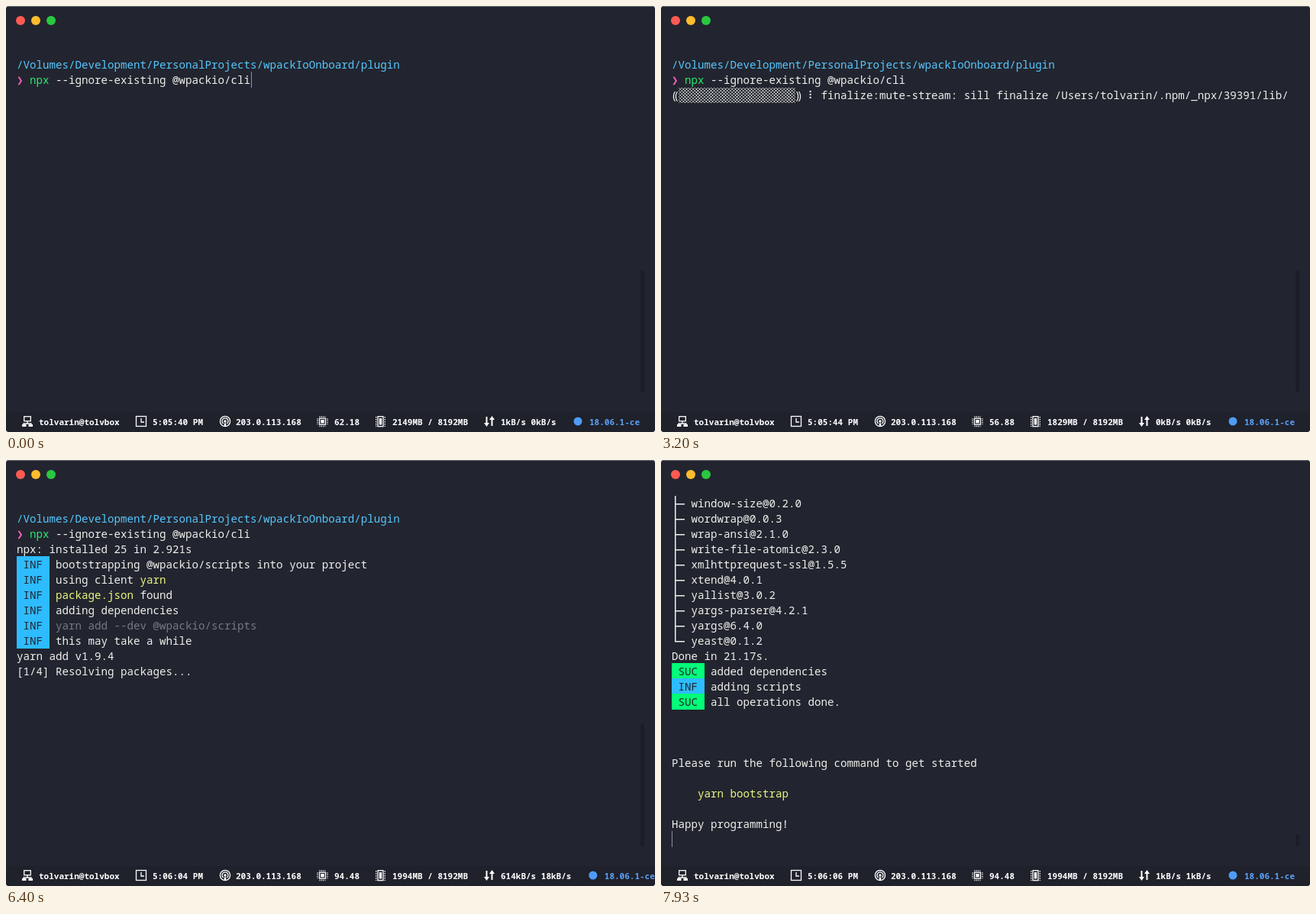
An HTML page that plays this animation: 850 px wide and 558 px high, repeating every 8000 ms.

```html
<!DOCTYPE html>
<html lang="en">
<head>
<meta charset="utf-8">
<title>Terminal</title>
<style>
html, body { margin: 0; width: 100%; height: 100%; overflow: hidden; background: #fff; }
#win { position: absolute; left: 0; top: 0; width: 850px; height: 558px; overflow: hidden;
  border-radius: 4px; background: #22252f; }
#edge { position: absolute; left: 0; top: 0; width: 100%; height: 1px; background: #6d6f76; }
.light { position: absolute; top: 13px; width: 12px; height: 12px; border-radius: 50%; }
#term { position: absolute; left: 14px; top: 47px; color: #eff0eb;
  font: 300 14.18px/20px "Noto Sans Mono", "DejaVu Sans Mono", monospace; font-variant-ligatures: none; }
.row { height: 20px; white-space: pre; }
.row i { display: inline-block; width: 1ch; height: 20px; font-style: normal; vertical-align: top; }
.path { color: #57c7ff; }
.pink { color: #ff5fc4; }
.green { color: #2fe871; }
.yellow { color: #eaf67f; }
.dim { color: #777981; }
.tag { display: inline-block; height: 20px; margin-top: -1px; padding-top: 1px; line-height: 20px;
  vertical-align: top; color: #22252f; font-weight: 400; }
.INF { background: #2dbcff; }
.SUC { background: #00ff78; }
.row .paren { letter-spacing: -5.6px; text-indent: -1px; }
.row .fill { background: radial-gradient(circle, #eff0eb 0.7px, transparent 1.1px) 0 0 / 4.25px 4px,
  radial-gradient(circle, #eff0eb 0.7px, transparent 1.1px) 2.12px 2px / 4.25px 4px; }
.row .twig { --h: 20px; width: 2ch;
  background: linear-gradient(#eff0eb, #eff0eb) 4px 0 / 1.5px var(--h) no-repeat,
  linear-gradient(#eff0eb, #eff0eb) 4px 9.5px / 14px 1.5px no-repeat; }
.row .last { --h: 11px; }
#cursor { position: absolute; width: 1px; height: 21px; background: #8e9095; }
#thumb { position: absolute; left: 831px; width: 5px; bottom: 52px; border-radius: 2px; background: #1c1e27; }
#bar { position: absolute; left: 0; top: 532px; background: #1f212b; }
#bar text { font: 600 11px "Noto Sans Mono", "DejaVu Sans Mono", monospace; fill: #fff; white-space: pre; }
#bar .line { fill: none; stroke: #fff; stroke-width: 1.3; }
</style>
</head>
<body>
<div id="win">
  <div id="edge"></div>
  <div class="light" style="left:13px;background:#ff5a52"></div>
  <div class="light" style="left:33px;background:#ffbd2e"></div>
  <div class="light" style="left:53px;background:#28c940"></div>
  <div id="thumb"></div>
  <div id="term"></div>
  <div id="cursor"></div>
  <svg id="bar" width="850" height="26" viewBox="0 532 850 26" fill="#fff">
    <g id="network">
      <rect class="line" x="23.700" y="537.700" width="8.600" height="6"/>
      <path class="line" d="M28 544v3M23 549v-2h10v2"/>
      <rect x="21" y="548" width="5.500" height="3"/><rect x="29.500" y="548" width="5.500" height="3"/>
    </g>
    <g id="time" class="line">
      <rect x="170.500" y="537.500" width="13" height="13"/>
      <path d="M177 540v5h4"/>
    </g>
    <g id="antenna">
      <circle class="line" cx="287" cy="544" r="6.600"/>
      <path class="line" d="M284.500 547a4 4 0 1 1 5 0"/>
      <circle cx="287" cy="544" r="1.700"/><path d="M285.600 546.500h2.800l-.5 4.500h-1.800z"/>
    </g>
    <g id="chip">
      <path class="line" stroke-width="2" stroke-dasharray="1.200 1.200"
        d="M410.400 538h8M410.400 550.500h8M408 540.200v8M421 540.200v8"/>
      <rect class="line" x="410.500" y="540.200" width="8" height="8"/>
      <rect x="412.300" y="542" width="4.400" height="4.400"/>
    </g>
    <g id="memory">
      <path class="line" stroke-dasharray="1.500 1.500" d="M484.700 538v13M496.300 538v13"/>
      <rect class="line" x="487" y="537.700" width="7" height="13"/>
      <rect x="488.800" y="540" width="3.400" height="8.500"/>
    </g>
    <g id="arrows">
      <path d="M628.500 538h2v8h2.500l-3.500 5-3.500-5h2.500zM635.500 550h2v-8h2.500l-3.500-5-3.500 5h2.500z"/>
    </g>
    <text x="43" y="549">tolvarin@tolvbox</text>
    <text id="clock" x="192" y="549"></text>
    <text x="301" y="549">203.0.113.168</text>
    <text id="cpu" x="430" y="549"></text>
    <text id="mem" x="506" y="549"></text>
    <text id="net" x="648" y="549"></text>
    <g id="engine">
      <circle cx="749" cy="544" r="5.500" fill="#4f9cf5"/>
      <text x="764" y="549" style="fill:#5ba0f7">18.06.1-ce</text>
    </g>
  </svg>
</div>
<script>
const LOOP = 8000, ROWS = 23, COL = 8.508, STEP = 66.6;
const HOME = "/Users/tolvarin/.npm";
const $ = id => document.getElementById(id);
const span = (cls, s) => `<span class="${cls}">${s}</span>`;
const tag = (kind, s) => span("tag " + kind, ` ${kind} `) + " " + s;
const twig = (s, last) => `<i class="twig${last ? " last" : ""}"></i> ${s}`;

const early = `accepts@1.3.5 acorn@5.7.2 after@0.8.2 ajv@6.5.3 ansi-regex@2.1.1 anymatch@2.0.0
 arr-diff@4.0.0 array-unique@0.3.2 assert@1.4.1 async@1.5.2 atob@2.1.2 autoprefixer@9.1.3
 babel-loader@8.0.2 base64id@1.0.0 batch@0.6.1 big.js@3.2.0 blob@0.0.4 bluebird@3.5.1
 braces@2.3.2 browserslist@4.1.0 buffer@4.9.1 bytes@3.0.0 cacache@10.0.4 camelcase@3.0.0`;
const middle = `p-limit@1.3.0 pako@1.0.6 parseqs@0.0.5 parseuri@0.0.5 parseurl@1.3.2 path-key@2.0.1
 pify@3.0.0 pkg-dir@2.0.0 portscanner@2.1.1 postcss@7.0.2 process@0.11.10 prr@1.0.1 pump@2.0.1
 punycode@1.4.1 qs@6.2.3 randombytes@2.0.6 raw-body@2.3.3 rc@1.2.8 readdirp@2.1.0 regenerate@1.4.0
 resolve@1.8.1 rimraf@2.6.2 run-queue@1.0.3`;
const late = `uuid@3.3.2 v8-compile-cache@2.0.2 vary@1.1.2 vm-browserify@0.0.4 watchpack@1.6.0
 webpack-cli@3.1.0 webpack-merge@4.1.4 webpack-sources@1.2.0 webpack@4.17.2 which-module@1.0.0
 which@1.3.1 window-size@0.2.0 wordwrap@0.0.3 wrap-ansi@2.1.0 write-file-atomic@2.3.0
 xmlhttprequest-ssl@1.5.5 xtend@4.0.1 yallist@3.0.2 yargs-parser@4.2.1 yargs@6.4.0`;
const tree = list => list.split(/\s+/).map(s => twig(s));

// Output blocks: time, lines
const output = [
  [0, "", span("path", "/Volumes/Development/PersonalProjects/wpackIoOnboard/plugin"),
    `<i class="pink">❯</i> ${span("green", "npx")} --ignore-existing @wpackio/cli`],
  [3470, "npx: installed 25 in 2.921s"],
  [3530, tag("INF", "bootstrapping @wpackio/scripts into your project"),
    tag("INF", "using client " + span("yellow", "yarn")),
    tag("INF", span("yellow", "package.json") + " found"),
    tag("INF", "adding dependencies"),
    tag("INF", span("dim", "yarn add --dev @wpackio/scripts")),
    tag("INF", "this may take a while")],
  [4070, "yarn add v1.9.4"],
  [4200, "[1/4] Resolving packages..."],
  [7130, "[2/4] Fetching packages...",
    "(node:39400) [DEP0005] DeprecationWarning: Buffer() is deprecated due to security and usability",
    "issues. Please use the Buffer.alloc(), Buffer.allocUnsafe(), or Buffer.from() methods instead."],
  [7200, "[3/4] Linking dependencies...",
    'warning "@wpackio/scripts &gt; fork-ts-checker-webpack-plugin@0.4.10" has unmet peer dependency "ts',
    'lint@^4.0.0 || ^5.0.0".'],
  [7330, "[4/4] Building fresh packages..."],
  [7470, "success Saved lockfile.", "success Saved 561 new dependencies.", "info Direct dependencies",
    twig("@wpackio/scripts@2.0.1", true), "info All dependencies"],
  [7530, ...tree(early)],
  [7600, ...tree(middle)],
  [7730, ...tree(late), twig("yeast@0.1.2", true), "Done in 21.17s."],
  [7930, tag("SUC", "added dependencies"), tag("INF", "adding scripts"), tag("SUC", "all operations done."),
    "", "", "", "Please run the following command to get started", "",
    "    " + span("yellow", "yarn bootstrap"), "", "Happy programming!"]
];

const status = {
  clock: [[0, "5:05:40"], [130, "5:05:41"], [1130, "5:05:42"], [2130, "5:05:43"], [3130, "5:05:44"],
    [4130, "5:05:45"], [5130, "5:05:46"], [5870, "5:06:03"], [6130, "5:06:04"], [7130, "5:06:05"], [7530, "5:06:06"]],
  cpu: [[0, "62.18"], [1400, "56.88"], [3870, "62.75"], [6400, "94.48"]],
  mem: [[0, "2149"], [1400, "1829"], [3870, "1852"], [6400, "1994"]],
  net: [[0, "1kB/s 0kB/s"], [1400, "0kB/s 0kB/s"], [4400, "2kB/s 1kB/s"], [5870, "614kB/s 18kB/s"], [7200, "1kB/s 1kB/s"]],
  blink: [[0, 1], [930, 0], [3470, 1], [4800, 0], [5400, 1], [6000, 0], [6600, 1]]
};
const suffix = { clock: " PM", cpu: "", mem: "MB / 8192MB", net: "" };
const at = (list, t) => list.filter(e => e[0] <= t).pop()[1];

const fetched = ["@wpackio/cli@2.0.1", "chalk@2.4.1", "commander@2.17.1", "inquirer@6.2.0", "ora@3.0.0", "slugify@1.3.1"];
const locked = ["figures", "@wpackio/cli", "ansi-regex", "rxjs", "lodash", "inquirer", "tslib"];
const placed = ["chardet", "mute-stream", "external-editor", "run-async", "@wpackio/cli"];

function message(n) {
  if (n < 0) return "rollbackFailedOptional: verb npm-session";
  if (n < 6) return `fetchMetadata: sill resolveWithNewModule ${fetched[n]} checking installable status`;
  if (n < 13) return `extract:${locked[n - 6]}: verb lock using ${HOME}/_locks/staging-4e1c07.lock`;
  return `finalize:${placed[n - 13]}: sill finalize ${HOME}/_npx/39391/lib/node_modules`;
}

function progress(t) {
  let n = -1;
  if (t >= 3130) n = 13 + Math.min(4, Math.floor((t - 3130) / STEP));
  else if (t >= 1930) n = Math.min(12, Math.floor((t - 1930) / STEP));
  const full = Math.max(0, Math.min(18, Math.round((n - 3) * 1.75)));
  const spin = "⠋⠙⠹⠸⠼⠴⠦⠧⠇⠏"[(7 + Math.floor(n * 0.8)) % 10];
  return `<i class="paren">((</i><i class="fill" style="width:${full}ch"></i>` + "·".repeat(18 - full) +
    `<i class="paren">))</i> <i>${spin}</i> ` + message(n).slice(0, 72);
}

let shown = "";
function draw(t) {
  const lines = output.filter(b => b[0] <= t).flatMap(b => b.slice(1));
  const busy = t >= 1530 && t < 3470;
  if (busy) lines.push(progress(t));
  const view = lines.slice(-(ROWS - 1));
  const html = view.map(s => `<div class="row">${s}</div>`).join("");
  if (html !== shown) $("term").innerHTML = shown = html;

  const typing = t < 330, cur = $("cursor").style;
  cur.left = Math.ceil(14 + (typing ? 36 * COL : 0)) + "px";
  cur.top = 46 + 20 * (view.length - (typing ? 1 : 0)) + "px";
  cur.visibility = !busy && at(status.blink, t) ? "visible" : "hidden";
  $("thumb").style.height = (t < 7530 ? 160 : 16) + "px";

  for (const id in suffix) {
    const s = at(status[id], t) + suffix[id];
    if ($(id).textContent !== s) $(id).textContent = s;
  }
  const extra = $("net").textContent.length - 11;
  $("engine").setAttribute("transform", `translate(${extra * 6.6} 0)`);
}

const start = performance.now();
function tick() {
  draw((performance.now() - start) % LOOP);
  requestAnimationFrame(tick);
}
tick();
</script>
</body>
</html>
```
